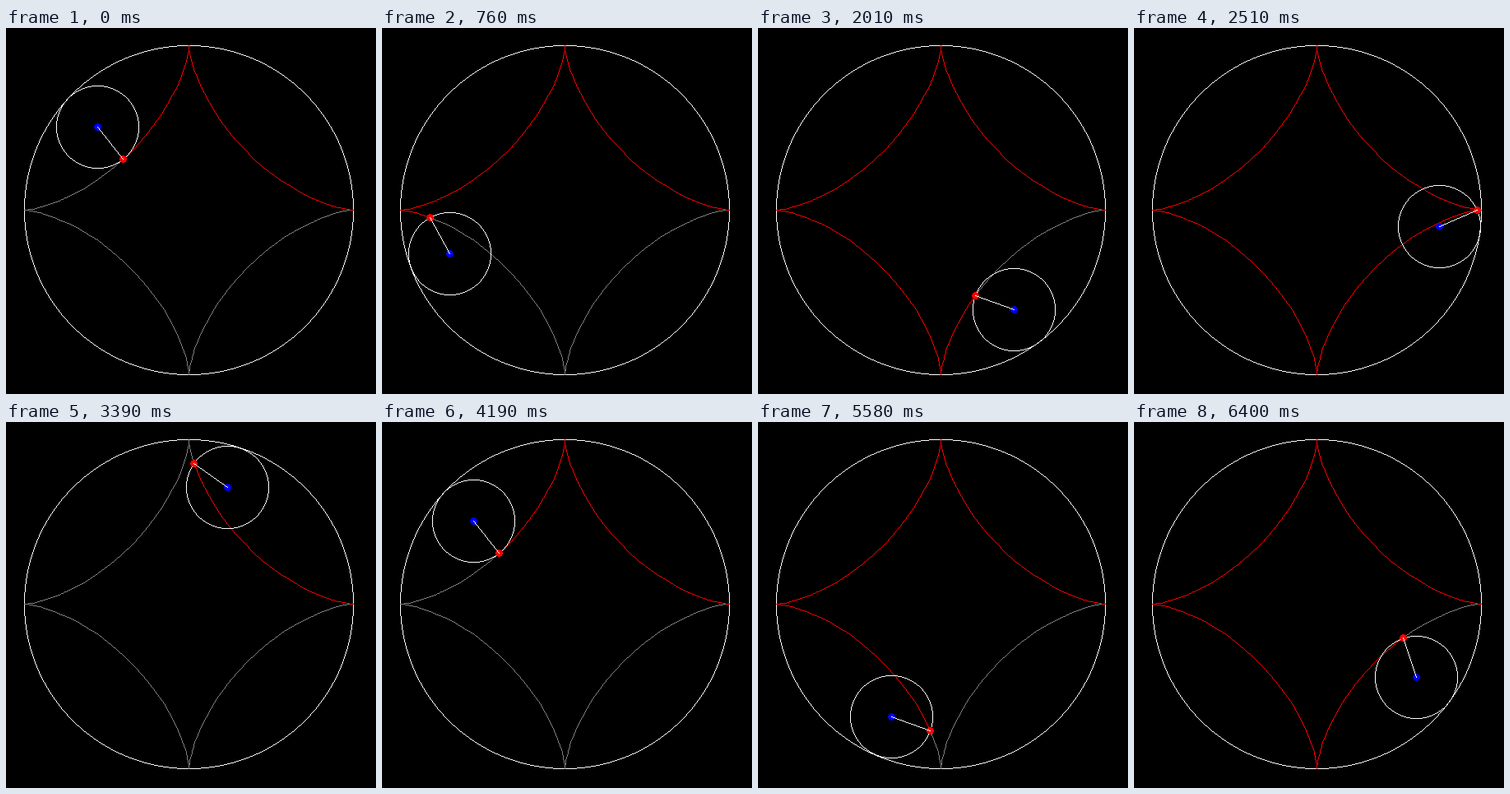
A matplotlib script that plays this animation: 450 by 445 pixels, repeating every 6420 ms.

```python
import numpy as np
import matplotlib.pyplot as plt
from matplotlib.animation import FuncAnimation

W, H, DPI = 450, 445, 100
CX, CY, R = 222, 221, 200
r = R // 4
STEP = 0.05            # radians per tick
TURN = 126             # ticks per revolution
INTERVAL, LOOP = 10, 6420

# Nearly even speed with a short rest after a faster stretch
TIMES = 0, 1510, 3390, 3940, 4190, 5580, 6400
TICKS = 48, 92, 151, 173, 174, 212, 239


def to_px(x, y):
    return np.rint([CX + x, CY - y]).astype(int)


def hub(t):
    return to_px((R - r) * np.cos(t), (R - r) * np.sin(t))


def pen(t):
    return to_px(R * np.cos(t) ** 3, R * np.sin(t) ** 3)


def line(p, q):
    """Pixels of a one pixel wide line, as a 2 x n array."""
    n = max(abs(q - p).max(), 1)
    return np.rint(np.linspace(p, q, n + 1).T)


def ring(radius):
    """Pixels of a circle outline around the origin."""
    i = np.arange(int(radius / np.sqrt(2)) + 1)
    j = np.rint(np.sqrt(radius ** 2 - i ** 2))
    return np.hstack([(a * u, b * v) for u, v in ((i, j), (j, i))
                      for a in (-1, 1) for b in (-1, 1)])


def disc(radius):
    y, x = np.mgrid[-radius:radius + 1, -radius:radius + 1]
    inside = x ** 2 + y ** 2 <= radius ** 2 + 2
    return np.array([x[inside], y[inside]])


def shift(pixels, p):
    return pixels + np.reshape(p, (2, 1))


corners = [pen(k * STEP) for k in range(TURN)] + [pen(0)]
segments = [line(p, q) for p, q in zip(corners, corners[1:])]
curve = np.hstack(segments)
ends = np.cumsum([0] + [s.shape[1] for s in segments])

fig = plt.figure(figsize=(W / DPI, H / DPI), dpi=DPI, facecolor="black")
ax = fig.add_axes([0, 0, 1, 1])
# Pixel markers fill the cell right of and above their point
ax.set(xlim=(0, W), ylim=(H - 1, -1))
ax.axis("off")


def layer(color):
    return ax.plot([], [], ",", color=color, antialiased=False)[0]


outer, rest, trace, wheel, hub_dot, pen_dot, arm = map(layer, (
    "white", "#808080", "red", "white", "blue", "red", "white"))
outer.set_data(shift(ring(R), (CX, CY)))
wheel_px, dot_px = ring(r), disc(4)


def update(i):
    k = int(np.interp(i * INTERVAL, TIMES, TICKS) + 1e-6) % TURN
    c, p = hub(k * STEP), pen(k * STEP)
    rest.set_data(curve[:, ends[k]:])
    trace.set_data(curve[:, :ends[k]])
    wheel.set_data(shift(wheel_px, c))
    hub_dot.set_data(shift(dot_px, c))
    pen_dot.set_data(shift(dot_px, p))
    arm.set_data(line(c, p))
    return rest, trace, wheel, hub_dot, pen_dot, arm


anim = FuncAnimation(fig, update, frames=LOOP // INTERVAL, interval=INTERVAL,
                     repeat=True, repeat_delay=0)
plt.show()
```
